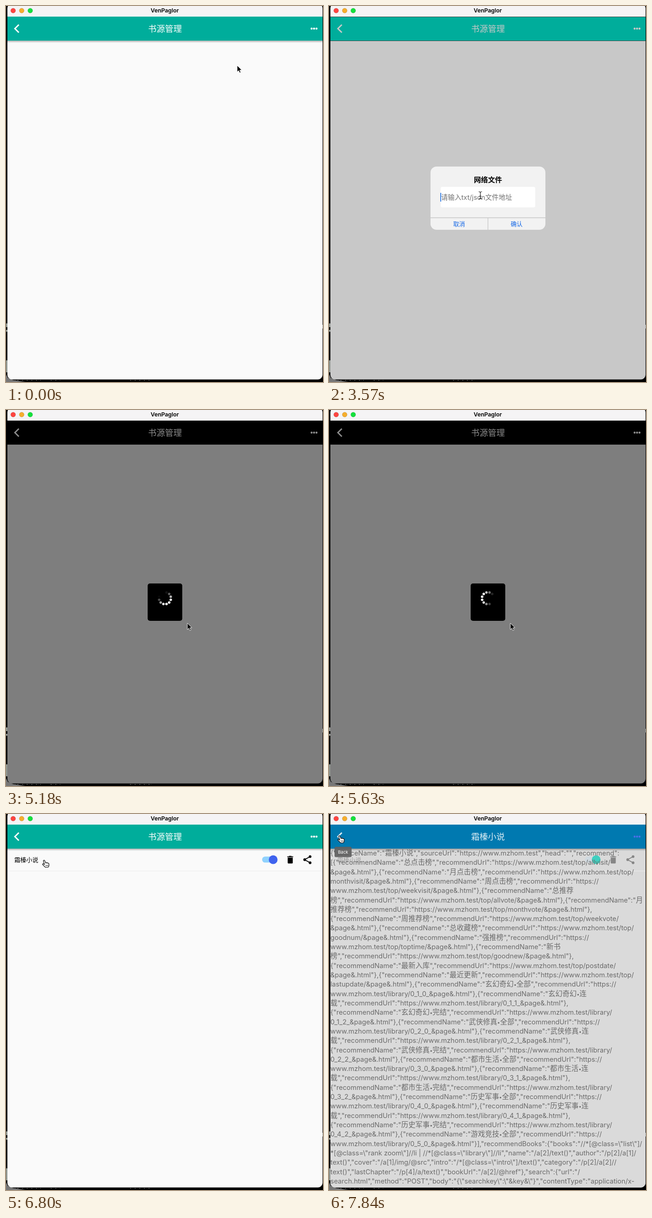
An HTML page that plays this animation: 687x815 px, repeating every 7990 ms.

```html
<!DOCTYPE html>
<html lang="zh-CN">
<head>
<meta charset="utf-8">
<title>Reader</title>
<style>
html, body { margin: 0; width: 100%; height: 100%; overflow: hidden; background: #000; }
svg { display: block; width: 100vw; height: 100vh; font-family: Inter, "Noto Sans CJK SC", "Noto Sans CJK", sans-serif; }
text { white-space: pre; }
.mid { text-anchor: middle; }
#menu .card { filter: drop-shadow(0 3px 3px rgba(0,0,0,.3)) drop-shadow(0 2px 4px rgba(0,0,0,.12)); }
</style>
</head>
<body>
<svg viewBox="0 0 687 815" preserveAspectRatio="none">
  <defs>
    <clipPath id="win"><rect x="3" y="-5" width="683" height="814.5" rx="10"/></clipPath>
    <clipPath id="field"><rect x="241" y="392" width="207" height="44"/></clipPath>
    <linearGradient id="fade" x2="0" y2="1">
      <stop offset="0" stop-opacity=".3"/><stop offset="1" stop-opacity="0"/>
    </linearGradient>
  </defs>
  <rect width="687" height="815"/>
  <g fill="#8f958f">
    <path d="M0 688h3v8H0zM0 702h3v4H0zM0 768h3v26H0zM686 691h1v8h-1z"/>
    <path d="M0 798L4 806 16 811 42 815H0z" fill="#777"/>
    <path d="M14 811.5H76M96 811.5H118M268 811.5H318" stroke="#666" stroke-dasharray="4 2 1 3"/>
  </g>

  <g clip-path="url(#win)">
    <rect id="body" y="23" width="687" height="792"/>
    <rect id="pageBody" y="23" width="687" height="792"/>
    <g id="row">
      <text id="rowName" x="18" y="103.8" font-size="13">霜榛小说</text>
      <path d="M3 123.5H686" stroke="#ececec"/>
      <rect id="track" x="555" y="92.3" width="32" height="13" rx="6.5" fill="#90d2fd"/>
      <circle id="thumb" cx="579" cy="99" r="9.5"/>
      <g id="icons">
        <path transform="translate(605 88) scale(.915)" d="M6 19c0 1.1.9 2 2 2h8c1.1 0 2-.9 2-2V7H6v12zM19 4h-3.5l-1-1h-5l-1 1H5v2h14V4z"/>
        <path d="M659 92.3L647 99l12 6.7" stroke="#000" stroke-width="1.9" fill="none"/>
        <circle cx="659" cy="92.3" r="2.9"/><circle cx="647.3" cy="99" r="2.9"/><circle cx="659" cy="105.7" r="2.9"/>
      </g>
    </g>
    <g id="json" font-size="14.6"></g>
    <rect id="shade" y="75" width="687" height="5" fill="url(#fade)"/>
    <rect id="head" y="23" width="687" height="52"/>
    <path id="edge" d="M0 23.5H687M0 75.5H687" stroke="#3c4a48"/>
    <path id="back" d="M27.8 40.5L19.3 49 27.8 57.5" fill="none" stroke-width="3"/>
    <text id="title" class="mid" x="344.5" y="55.5" font-size="18.3" font-weight="500"></text>
    <g id="dots"><circle cx="662.3" cy="49" r="2.2"/><circle cx="667.6" cy="49" r="2.2"/><circle cx="672.9" cy="49" r="2.2"/></g>
    <rect y="-5" width="687" height="28" fill="#f5f4f5"/>
    <text class="mid" x="344" y="14.3" font-size="12.3" font-weight="600">VenPaglor</text>
    <g stroke="#000" stroke-opacity=".15">
      <circle cx="15.5" cy="10" r="5.3" fill="#fe4540"/><circle cx="34" cy="10" r="5.3" fill="#f6ae2d"/><circle cx="52.5" cy="10" r="5.3" fill="#14e13c"/>
    </g>

    <g id="menu">
      <rect class="card" x="524" y="30.5" width="155" height="104" rx="2" fill="#fff"/>
      <rect id="hover" x="524" y="38" width="155" height="44" fill="#f2f2f2"/>
      <circle id="ripple" cx="640" cy="62" r="8" fill="#dcdcdc"/>
      <g fill="#3a66ee">
        <path transform="translate(553.5 49) scale(.915)" d="M19 9h-4V3H9v6H5l7 7 7-7zM5 18v2h14v-2H5z"/>
        <path transform="translate(553.5 93) scale(.915)" d="M20 6h-8l-2-2H4c-1.1 0-2 .9-2 2v12c0 1.1.9 2 2 2h16c1.1 0 2-.9 2-2V8c0-1.1-.9-2-2-2zM13 17v-3H8v-2h5V9l4 4z"/>
      </g>
      <g font-size="14.7"><text x="590" y="65.6">网络文件</text><text x="590" y="109.6">本地文件</text></g>
    </g>

    <g id="dialog">
      <rect x="220" y="348" width="249" height="137" rx="13" fill="#f2f2f2"/>
      <rect x="242" y="392" width="205" height="44.5" rx="4" fill="#fff"/>
      <text class="mid" x="344.5" y="382.3" font-size="15.3" font-weight="600">网络文件</text>
      <g clip-path="url(#field)" font-size="14.6">
        <text id="hint" x="243" y="420" fill="#727272">请输入txt/json文件地址</text>
        <text id="url" x="445.5" y="419" text-anchor="end">ka.vomrund.test/beetle.json</text>
        <rect id="caret" y="405" width="1.8" height="19" fill="#2a78e4"/>
      </g>
      <path d="M220 459H469M344.5 459V485" stroke="#c6c6c6" stroke-width="1.3"/>
      <g class="mid" font-size="12.8" fill="#1266e6"><text x="282" y="476.8">取消</text><text x="406.5" y="476.8">确认</text></g>
    </g>

    <g id="loader">
      <rect x="307" y="376" width="75" height="81" rx="5"/>
      <g id="spin" fill="#fff"></g>
    </g>

    <g id="tip">
      <rect x="12" y="71" width="37" height="22.5" rx="3" fill="#616161" fill-opacity=".92"/>
      <text class="mid" x="30.5" y="85.6" font-size="9.5" fill="#fff">Back</text>
    </g>
  </g>

  <g id="arrow"><path d="M0 0V14L3.2 11 5.5 16 7.8 15 5.6 10H10z" stroke="#fff" stroke-width=".9"/></g>
  <g id="hand">
    <path d="M0 1.5C.5-.5 2.5-.3 3 1.3L5 6.2C6 5 7.4 5.3 7.7 6.2 8.6 5.3 9.8 5.7 10.1 6.8 11.4 6.3 12 7 12 8.3V12.5L10.2 15.5H4.2L-1.6 9.6C-2.4 8.3-.7 7.4.7 8.3L2.3 9.5z" fill="#fff" stroke="#000" stroke-width="1.2"/>
    <path d="M5.5 10.5v2.5M7.6 10.5v2.5M9.6 10.5v2.5" stroke="#000" stroke-width=".9"/>
  </g>
  <g id="beam"><path d="M-3.5-7.5C-1.5-7.5 0-7 0-5.5C0-7 1.5-7.5 3.5-7.5M0-5.5V6M-3.5 8C-1.5 8 0 7.5 0 6C0 7.5 1.5 8 3.5 8M-2 2H2" fill="none" stroke="#111" stroke-width="1.2"/></g>
</svg>
<script>
const LOOP = 7990, STEP = 148;
const el = {};
document.querySelectorAll('[id]').forEach(e => el[e.id] = e);
const set = (id, attrs) => { for (const k in attrs) el[id].setAttribute(k, attrs[k]); };
const ramp = (t, a, b) => Math.min(1, Math.max(0, (t - a) / (b - a)));
const within = (t, a, b) => t >= a && t < b;
const show = (id, k) => set(id, { opacity: +k, visibility: k > 0 ? 'visible' : 'hidden' });
const rgb = h => [1, 3, 5].map(i => parseInt(h.slice(i, i + 2), 16));
const blend = (base, ...layers) => {
  let c = rgb(base);
  for (const [hex, k] of layers) c = rgb(hex).map((v, i) => c[i] + (v - c[i]) * k);
  return `rgb(${c.map(Math.round)})`;
};

// Text of the detail page
const site = 'www.mzhom.test', ranks = site + '/top/', lib = site + '/library/';
const rec = n => '{"recommendName":"' + n;
const url = '","recommendUrl":"https://', end = '&page&.html"},';
const genres = ['玄幻奇幻', '武侠修真', '都市生活', '历史军事', '游戏竞技'];
const lines = [
  `{"sourceName":"霜榛小说","sourceUrl":"https://${site}","head":"","recommend":`,
  '[' + rec('总点击榜') + url + ranks + 'allvisit/',
  end + rec('月点击榜') + url + ranks,
  'monthvisit/' + end + rec('周点击榜') + url,
  ranks + 'weekvisit/' + end + rec('总推荐'),
  '榜' + url + ranks + 'allvote/' + end + rec('月'),
  '推荐榜' + url + ranks + 'monthvote/' + end,
  rec('周推荐榜') + url + ranks + 'weekvote/',
  end + rec('总收藏榜') + url + ranks,
  'goodnum/' + end + rec('强推榜') + url,
  ranks + 'toptime/' + end + rec('新书'),
  '榜' + url + ranks + 'goodnew/' + end,
  rec('最新入库') + url + ranks + 'postdate/',
  end + rec('最近更新') + url + ranks,
  'lastupdate/' + end + rec('玄幻奇幻•全部') + url
];
for (let g = 1; g < 5; g++) {
  const name = genres[g - 1];
  lines.push(
    `${lib}0_${g}_0_${end}${rec(name)}•连`,
    `载${url}${lib}0_${g}_1_${end}`,
    rec(name) + '•完结' + url + lib,
    `0_${g}_2_${end}${rec(genres[g])}•全部${url}`);
}
lines.push(...(lib + String.raw`0_5_0_&page&.html"}],"recommendBooks":{"books":"//*[@class=\"list\"]/
*[@class=\"rank zoom\"]//li | //*[@class=\"library\"]//li","name":"/a[2]/text()","author":"/p[2]/a[1]/
text()","cover":"/a[1]/img/@src","intro":"/*[@class=\"intro\"]/text()","category":"/p[2]/a[2]//
text()","lastChapter":"/p[4]/a/text()","bookUrl":"/a[2]/@href"},"search":{"url":"/
search.html","method":"POST","body":"{\"searchkey\":\"&key&\"}","contentType":"application/x-
www-form-urlencoded"},"searchBooks":{"books":"//*[@class=\"list\"]//li","name":"/a[2]/`).split('\n'));
el.json.innerHTML = lines.map((s, i) => {
  const html = s.replace(/&/g, '&amp;')
    .replace(/[\u4e00-\u9fff]+/g, '<tspan font-size="15.4">$&</tspan>')
    .replace(/•/g, '<tspan font-size="11">•</tspan>');
  return `<text x="3" y="${90 + i * 20.31}">${html}</text>`;
}).join('');

// Spinner dots
const DOTS = 12;
el.spin.innerHTML = Array.from({ length: DOTS }, (_, i) => {
  const a = (15 + i * 30) * Math.PI / 180;
  return `<circle cx="${344.5 + 13 * Math.cos(a)}" cy="${408 + 13 * Math.sin(a)}" r="2.7"/>`;
}).join('');

// Pointer track: time, x, y
const track = [
  [0, 501, 129], [148, 525, 112], [592, 667, 48], [888, 667, 48], [1184, 640, 58], [1628, 640, 58],
  [1776, 443.5, 148], [2072, 400, 230], [2664, 335, 395], [3108, 328, 410], [3700, 328, 410],
  [4000, 521, 440], [4144, 521, 440], [4440, 394, 463], [4588, 391, 461], [4884, 393, 462],
  [6068, 393, 462], [6364, 260, 260], [6660, 90, 108], [6808, 81, 100], [7252, 81, 100],
  [7548, 26, 52], [7696, 21, 47]
];
function pointer(t) {
  const i = track.findIndex(p => p[0] > t);
  if (i < 0) return track[track.length - 1].slice(1);
  const [t0, x0, y0] = track[i - 1], [t1, x1, y1] = track[i];
  const k = (t - t0) / (t1 - t0);
  return [x0 + (x1 - x0) * k, y0 + (y1 - y0) * k];
}
function pointerKind(t) {
  if (within(t, 590, 1700) || within(t, 4400, 4880) || t >= 6640) return 'hand';
  return within(t, 2660, 3840) ? 'beam' : 'arrow';
}

function draw(now) {
  const t = Math.floor((now % LOOP + 10) / STEP) * STEP;
  const dim = ramp(t, 2060, 2500) * (1 - ramp(t, 4750, 5040));
  const load = ramp(t, 4900, 5180) * (1 - ramp(t, 5900, 6220));
  const page = ramp(t, 6960, 7250);
  const leave = ramp(t, 7700, 7840);

  set('body', { fill: blend('#fafafa', ['#c8c8c8', dim], ['#7e7e7e', load]) });
  set('head', { fill: blend('#00ad9b', ['#000000', load], ['#0079b0', page]) });
  const fg = blend('#ffffff', ['#c8c8c8', dim], ['#8a8a8a', load], ['#dcedf4', leave]);
  set('title', { fill: fg });
  set('back', { stroke: fg });
  set('dots', { fill: blend(fg === 'none' ? '#ffffff' : '#ffffff', ['#c8c8c8', dim], ['#8a8a8a', load], ['#4c6ee8', leave]) });
  el.title.textContent = page > .4 ? '霜榛小说' : '书源管理';
  show('edge', dim * (1 - load));
  show('shade', (1 - dim) * (1 - load));

  show('pageBody', page);
  set('pageBody', { fill: blend('#fafafa', ['#dadada', leave]) });
  show('json', page);
  set('json', { fill: blend('#202020', ['#6a6a6a', leave]) });
  show('row', t >= 6060 ? Math.max(1 - page, leave) : 0);
  set('rowName', { opacity: 1 - .72 * leave });
  set('icons', { opacity: 1 - .62 * leave });
  set('track', { opacity: 1 - .85 * leave });
  set('thumb', { fill: blend('#3f63ee', ['#3fd0c0', leave]) });

  show('menu', ramp(t, 600, 890) * (1 - ramp(t, 1790, 2080)));
  const picked = t < 2100;
  show('hover', t >= 1030 && picked);
  show('ripple', t >= 1470 && picked);

  show('dialog', dim);
  const pasted = t >= 4140;
  show('hint', dim && !pasted);
  show('url', dim && pasted);
  show('caret', dim && (within(t, 2660, 3100) || within(t, 3540, 3990) || pasted) ? 1 : 0);
  set('caret', { x: pasted ? 445.2 : 241.3 });

  show('loader', load);
  const peak = 190 + (t - 5624) * .3;
  [...el.spin.children].forEach((dot, i) => {
    const k = .5 + .5 * Math.cos((15 + i * 30 - peak) * Math.PI / 180);
    dot.setAttribute('opacity', ramp(k, .1, .9).toFixed(2));
  });
  show('tip', t >= 7690);

  const [x, y] = pointer(t), kind = pointerKind(t);
  for (const id of ['arrow', 'hand', 'beam']) {
    show(id, id === kind);
    set(id, { transform: `translate(${x} ${y})` });
  }
}

// Hints and typed text appear at full strength inside the fading dialog
const start = performance.now();
function tick() {
  draw(performance.now() - start);
  requestAnimationFrame(tick);
}
tick();
</script>
</body>
</html>
```
